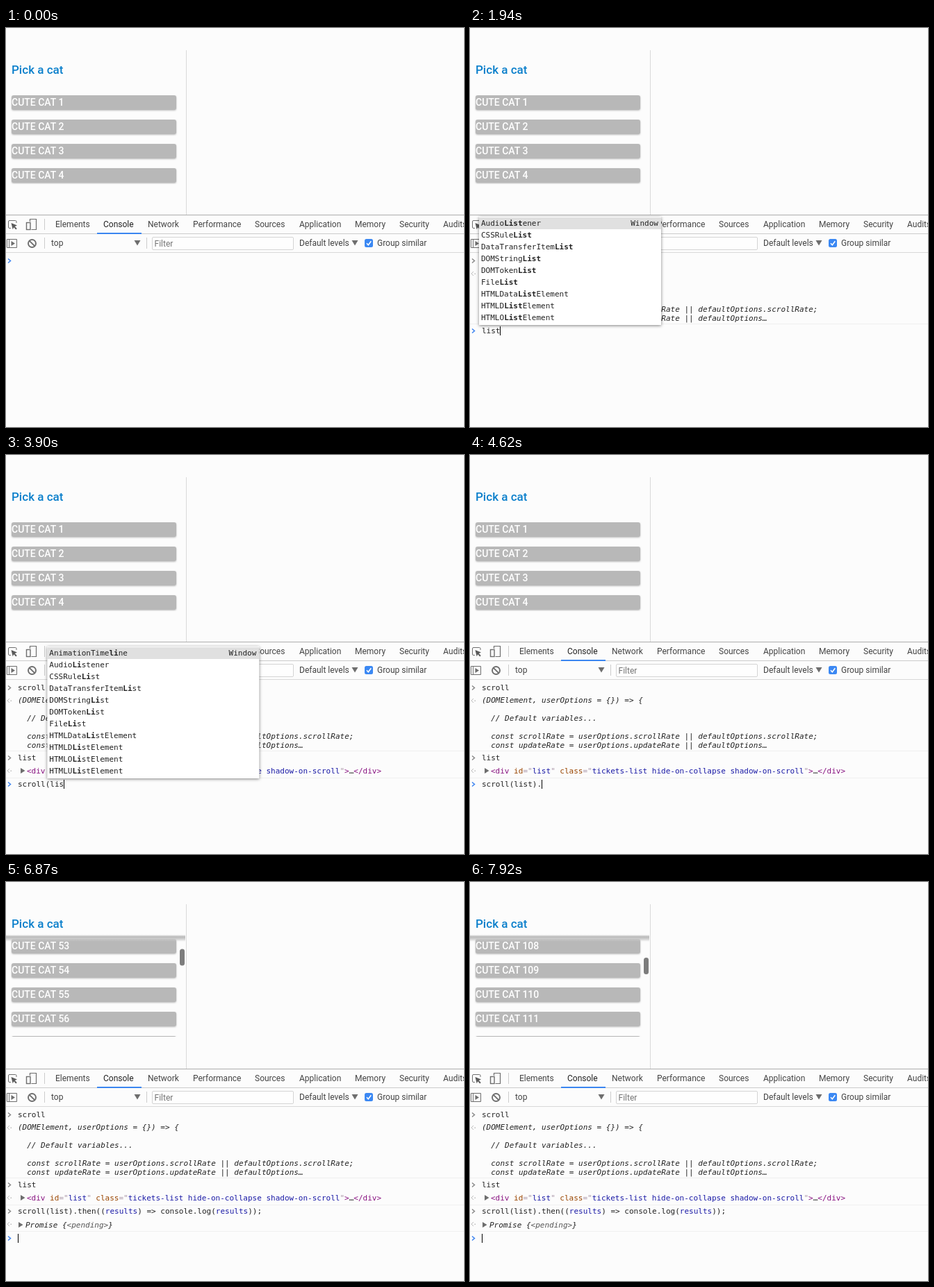
Animation, 659 px wide and 575 px high, one loop 8000 ms. Source, as an HTML page:

```html
<!DOCTYPE html>
<html lang="en">
<head>
<meta charset="utf-8">
<title>Console scroll demo</title>
<style>
  html, body { margin: 0; width: 100%; height: 100%; overflow: hidden; background: #fcfcfc; }
  svg { display: block; }
  text { white-space: pre; }
  .ui { font: 12px Roboto, sans-serif; fill: #444; }
  .mono { font: 11px "DejaVu Sans Mono", monospace; fill: #222; }
  .it { font-style: italic; }
  .b { font-weight: bold; }
  .title { font: 500 17px Roboto, sans-serif; fill: #0a7fcb; }
  .cat { font: 500 14px Roboto, sans-serif; fill: #fff; }
  .bar { fill: #b8b8b8; filter: drop-shadow(0 1px 1px rgba(0, 0, 0, .25)); }
  .box { fill: #fff; filter: drop-shadow(0 1px 2px rgba(0, 0, 0, .5)); }
  .line { fill: none; stroke: #6e6e6e; }
</style>
</head>
<body>
<svg width="659" height="575" viewBox="0 0 659 575">
  <defs>
    <linearGradient id="shade" x2="0" y2="1">
      <stop offset="0" stop-color="#aaa" stop-opacity="0"/>
      <stop offset=".3" stop-color="#b9b9b9"/>
      <stop offset=".6" stop-color="#c6c6c6" stop-opacity=".85"/>
      <stop offset="1" stop-color="#ccc" stop-opacity="0"/>
    </linearGradient>
  </defs>
  <g id="fixed"></g>
  <g id="live"></g>
</svg>
<script>
const LOOP = 8000, CHAR = 6.623;
const COMMAND = 'scroll(list).then((results) => console.log(results));';
const BASE = [339, 440, 478, 517];   // baselines of the four prompts

const SCROLL_WORDS = ('scroll scrollBy scrollTo scrollX scrollY scrollbars scrollLeft scrollList scrollRate ' +
  'scrollTop onscroll screen screenLeft screenTop screenX screenY self status stop').split(' ');
const LIST_WORDS = ('AnalyserNode AnimationTimeline AudioListener CSSRuleList DataTransferItemList DOMStringList ' +
  'DOMTokenList FileList HTMLDataListElement HTMLDListElement HTMLOListElement HTMLUListElement MediaList ' +
  'NodeList StyleSheetList TouchList').split(' ');
const HISTORY = [COMMAND.slice(7), 'list).then(console.log);'];

// [time, prompt, typed text, completion query, show the rest as a hint]
const STEPS = [
  [0, 0, ''], [240, 0, 's'], [300, 0, 's', 's'], [420, 0, 'sc', 'sc'], [560, 0, 'scr', 'scr'],
  [680, 0, 'scro', 'scro'], [860, 0, 'scrol', 'scrol'], [980, 0, 'scroll', 'scroll'],
  [1160, 1, ''], [1520, 1, 'l'], [1580, 1, 'l', 'l'], [1700, 1, 'li', 'li'], [1820, 1, 'lis', 'lis'],
  [1880, 1, 'list', 'lis'], [1940, 1, 'list', 'list'], [2000, 1, 'list'],
  [2050, 2, ''], [2230, 2, 's', 's'], [2350, 2, 'sc', 'sc'], [2530, 2, 'scr', 'scr'],
  [2590, 2, 'scro', 'scro'], [2770, 2, 'scrol', 'scrol'], [2890, 2, 'scroll', 'scroll'],
  [3070, 2, 'scroll('], [3370, 2, 'scroll(l', 'l'], [3840, 2, 'scroll(li', 'li'], [3900, 2, 'scroll(lis', 'li'],
  [3960, 2, 'scroll(lis', 'lis'], [4140, 2, 'scroll(list', 'lis'], [4200, 2, 'scroll(list', 'list'],
  [4380, 2, 'scroll(list)', 'list)', true], [4620, 2, 'scroll(list).'],
  [4800, 2, 'scroll(list).t', '', true], [4860, 2, 'scroll(list).th', '', true],
  [5100, 2, 'scroll(list).the', '', true], [5160, 2, 'scroll(list).then', '', true],
  [5520, 2, COMMAND], [5760, 3, '']
];

// Scrolling repaints in uneven ticks: [from, interval]
const TICKS = [[5760, 70], [6040, 410 / 7], [6450, 120], [6570, 60], [6870, 460 / 7], [7330, 120], [7450, 470 / 7], [7920, 80]];
const SCROLL = [[5838, 0], [6040, 360], [6870, 1835], [7920, 3760]];

const esc = s => s.replace(/&/g, '&amp;').replace(/</g, '&lt;');
const text = (x, y, cls, body) => `<text x="${x}" y="${y}" class="${cls}">${body}</text>`;
const mono = (x, y, body, cls = '') => text(x, y, 'mono ' + cls, body);
const ink = (color, s) => `<tspan fill="${color}">${esc(s)}</tspan>`;
const rect = (x, y, w, h, fill, more = '') => `<rect x="${x}" y="${y}" width="${w}" height="${h}" fill="${fill}" ${more}/>`;
const path = (d, fill, more = '') => `<path d="${d}" fill="${fill}" ${more}/>`;
const chevron = (y, color) => path(`M3 ${y - 3}l3.5 3-3.5 3`, 'none', `stroke="${color}" stroke-width="1.5"`);
const reply = y => path(`M5 ${y - 3}l-3 3 3 3`, 'none', 'stroke="#bbb"') + rect(6.5, y - .5, 1.5, 1.5, '#bbb');
const expander = (x, y) => path(`M${x} ${y - 4}l6.5 4-6.5 4z`, '#6e6e6e');
const rule = y => rect(0, y, 659, 1, '#f0f0f0');
const colored = s => esc(s).replace(/results/g, ink('#1a1aa6', 'results'));
const lastBefore = (list, t) => list.filter(e => e[0] <= t).pop();

function toolbars() {
  const tabs = { Elements: 71, Console: 140, Network: 204, Performance: 269, Sources: 358,
    Application: 422, Memory: 502, Security: 566, Audits: 629 };
  const names = Object.entries(tabs).map(([name, x]) =>
    text(x, 287, 'ui', name === 'Console' ? ink('#222', name) : name)).join('');
  return rect(259, 32, 1, 237, '#dadada') + text(8, 66, 'title', 'Pick a cat') +
    rect(0, 269, 659, 1, '#adadad') + rect(0, 296, 659, 1, '#ccc') + rect(0, 323, 659, 1, '#d8d8d8') +
    rect(131, 295, 64, 2, '#3b86f0') + names +
    rect(55, 275, 1, 16, '#ccc') + rect(55, 302, 1, 16, '#ccc') + rect(202, 302, 1, 16, '#ccc') +
    // inspect and device icons
    path('M7 288.500H5q-1.500 0-1.500-1.500v-8q0-1.500 1.500-1.500h8.500q1.500 0 1.500 1.500v2', 'none', 'stroke="#6e6e6e"') +
    path('M7.500 281l8.500 3.500-3.300 1.400 3 3.200-1.400 1.300-3-3.200-1.600 3z', '#5a5a5a') +
    path('M34.500 279v-3.500h9v15h-7', 'none', 'stroke="#6e6e6e" stroke-width="1.2"') +
    rect(29.500, 280.500, 5.500, 10, '#fcfcfc', 'stroke="#6e6e6e" stroke-width="1.400"') +
    // sidebar and clear icons
    '<path class="line" d="M1.500 304.500h14v12h-14zM4.500 304.500v12"/>' + path('M7.500 307l5.500 3.500-5.500 3.500z', '#6e6e6e') +
    '<g class="line" stroke-width="1.900"><circle cx="37.500" cy="310.500" r="5.500"/><path d="M33.600 306.600l7.800 7.800"/></g>' +
    text(65, 314, 'ui', 'top') + path('M184.500 306h9l-4.500 7.500z', '#6e6e6e') +
    rect(210.500, 301.500, 203, 18, '#fefefe', 'rx="1.500" stroke="#d4d4d4"') + text(213.500, 315, 'ui', ink('#757575', 'Filter')) +
    text(422, 314, 'ui', 'Default levels') + path('M497.500 306h9l-4.500 7.500z', '#6e6e6e') +
    rect(516, 304, 12, 12, '#3b88f3', 'rx="2.500"') +
    path('M519 310.300l2.300 2.500 4-5.600', 'none', 'stroke="#fff" stroke-width="1.600"') +
    text(534, 314, 'ui', 'Group similar');
}

function scrollTop(t) {
  if (t < SCROLL[0][0]) return 0;
  const [from, gap] = lastBefore(TICKS, t);
  const at = from + Math.floor((t - from) / gap + 1e-6) * gap;
  const i = SCROLL.findIndex(k => k[0] >= at);
  if (i < 1) return 0;
  const [t0, y0] = SCROLL[i - 1], [t1, y1] = SCROLL[i];
  return Math.round((y0 + (y1 - y0) * (at - t0) / (t1 - t0)) / 5) * 5;
}

function cats(t) {
  const top = scrollTop(t), first = Math.max(0, Math.floor((top - 36) / 35));
  let rows = '';
  for (let i = first; i < first + 6; i++) {
    const y = 97 - 82 + i * 35 - top;
    rows += rect(8, y, 237, 21, '', 'rx="3" class="bar"') + text(8, y + 15, 'cat', `CUTE CAT ${i + 1}`);
  }
  const list = `<svg y="82" width="259" height="${top ? 141 : 143}">${rows}</svg>`;
  if (!top) return list.replace(/<rect[^>]*y="155".*(?=<\/svg>)/, '');
  return list + rect(0, 76, 258, 10, 'url(#shade)') + rect(250, 84.500 + top * .0065, 7, 24, '#7d7d7d', 'rx="3.500"');
}

function output(prompt) {
  let s = '';
  if (prompt > 0) {
    s += chevron(335.500, '#888') + mono(17, 339, 'scroll') + reply(354) +
      [[357, '(DOMElement, userOptions = {}) => {'], [383, '  // Default variables...'],
       [409, '  const scrollRate = userOptions.scrollRate || defaultOptions.scrollRate;'],
       [422, '  const updateRate = userOptions.updateRate || defaultOptions…']]
        .map(([y, line]) => mono(17, y, line, 'it')).join('') + rule(426);
  }
  if (prompt > 1) {
    const tag = s => ink('#881280', s), soft = s => ink('#a894a6', s), val = s => ink('#1a1aa6', s);
    const attr = (name, value) => ink('#994500', ' ' + name) + soft('="') + val(value) + soft('"');
    s += chevron(436.500, '#888') + mono(17, 440, 'list') + reply(455) + expander(21, 455) +
      mono(30, 459, tag('<div') + attr('id', 'list') +
        attr('class', 'tickets-list hide-on-collapse shadow-on-scroll') + tag('>') + '…' + tag('</div>')) + rule(465);
  }
  if (prompt > 2) {
    s += chevron(474.500, '#888') + mono(17, 478, colored(COMMAND)) + reply(493) + expander(18, 494) +
      mono(28, 498, 'Promise {' + ink('#555', '<pending>') + '}', 'it') + rule(503);
  }
  return s;
}

function popup(prompt, typed, query) {
  const past = query.endsWith(')');
  const words = past ? HISTORY : query[0] === 's' ? SCROLL_WORDS : LIST_WORDS;
  const base = BASE[prompt], below = prompt === 0 || past;
  const room = below ? 20 : Math.floor((base - 287) / 17);
  const found = words.filter(w => w.toLowerCase().includes(query)).slice(
    query === 'list' || query === 'lis' ? 0 : 0, room);
  const w = prompt === 1 ? 262 : 305, h = found.length * 17 + 3;
  const x = 13 + (typed.lastIndexOf('(') + 1) * CHAR, y = below ? base + 7 : base - 12 - h;
  const rows = found.map((word, i) => {
    const at = word.toLowerCase().indexOf(query), end = at + query.length;
    return mono(3, 13 + i * 17, esc(word.slice(0, at)) +
      `<tspan class="b">${esc(word.slice(at, end))}</tspan>` + esc(word.slice(end)));
  }).join('');
  const group = past ? '' : `<text x="${w - 4}" y="13" class="mono" text-anchor="end">Window</text>`;
  return rect(x, y, w, h, '', 'class="box"') +
    `<svg x="${x}" y="${y}" width="${w}" height="${h}">${rect(0, 1, w, 17, '#e0e0e0')}${rows}${group}</svg>`;
}

function promptLine(t) {
  const [, prompt, typed, query, hint] = lastBefore(STEPS, t);
  const base = BASE[prompt], end = 17 + typed.length * CHAR;
  let s = output(prompt) + chevron(base - 3.500, '#3b82f0') + mono(17, base, colored(typed));
  if (hint) s += mono(end, base, ink('#aaa', COMMAND.slice(typed.length)));
  if (/[()]$/.test(typed)) {
    s += rect(17 + 6 * CHAR, base + 2, 6, 1, '#b08080');
    if (typed.endsWith(')')) s += rect(end - CHAR, base + 2, 6, 1, '#b08080');
  }
  const blinkOn = prompt < 3 || (t - 5760) % 1000 < 500;
  if (t >= 240 && blinkOn) s += rect(Math.floor(end), base - 10, 1, 13, '#000');
  return query ? s + popup(prompt, typed, query) : s;
}

const live = document.getElementById('live');
document.getElementById('fixed').innerHTML = toolbars();
let shown = '';
function draw() {
  const t = performance.now() % LOOP;
  const next = cats(t) + promptLine(t);
  if (next !== shown) live.innerHTML = shown = next;
  requestAnimationFrame(draw);
}
draw();
</script>
</body>
</html>
```
